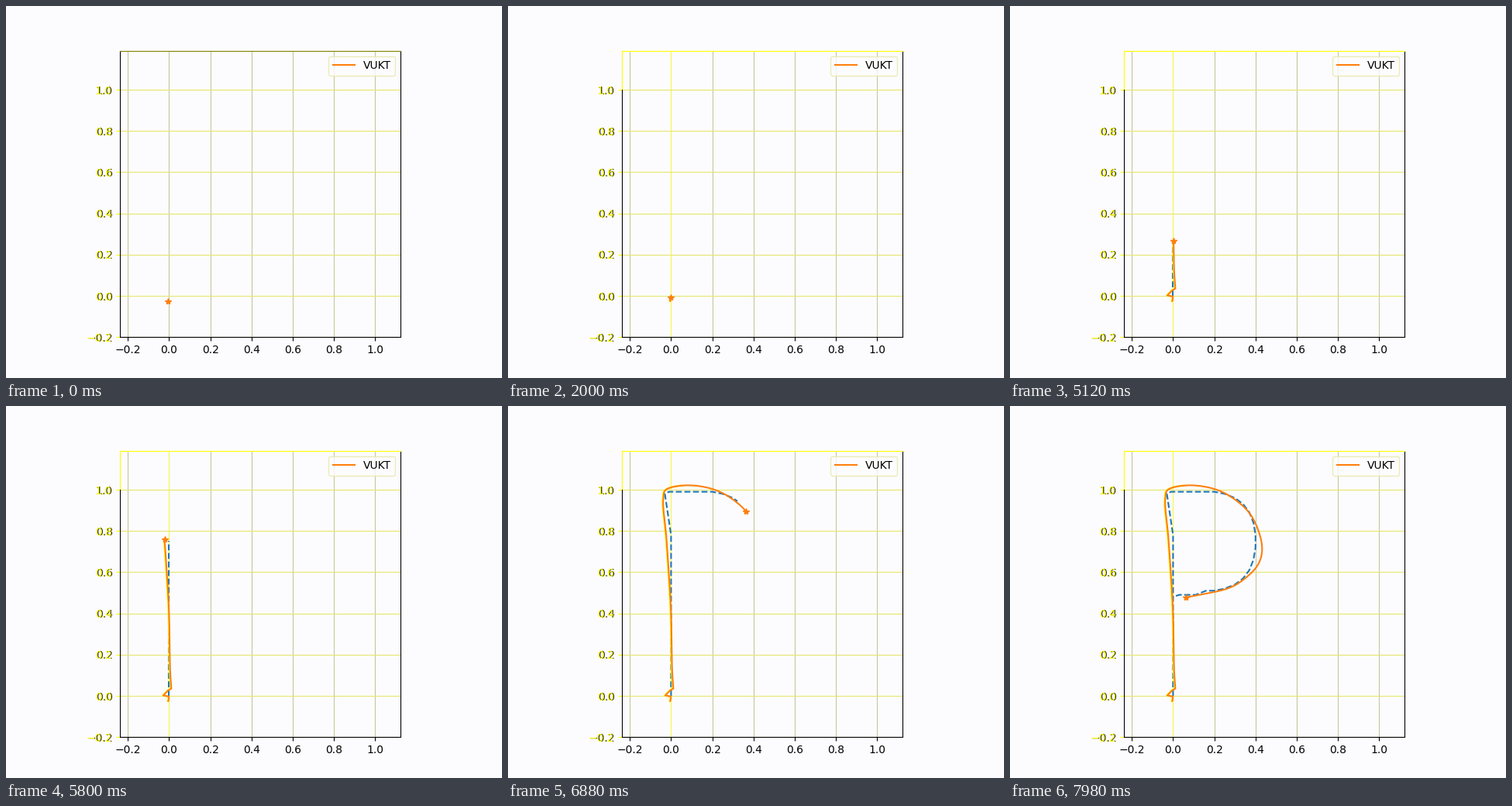
Write a matplotlib script that moves like this. It is 640x480 px and loops after 8000 ms.

```python
import numpy as np
import matplotlib.pyplot as plt
from matplotlib.animation import FuncAnimation

W, H, STEP, FRAMES = 640, 480, 20, 400
X0, Y0, UNIT = 210.4, 374.0, 266.0      # pixel position of (0, 0), pixels per unit
LEFT, RIGHT, TOP, BOTTOM = 147.4, 509.4, 57.6, 427.2

PAPER, YELLOW, ORANGE, BLUE = "#fcfcfe", "#ffff00", "#ff7f0e", "#1f77b4"
GRID_V, GRID_H, GRID_ZERO = "#c6c69c", "#e6e670", "#f6f650"

PLAN_START, STROKE_START, STEM_END, END = 4000, 4580, 5830, 7980   # ms

# key points: time in ms, x, y
DRIFT = np.array([(0, -.004, -.025), (900, 0, -.01), (2900, -.002, -.003),
                  (3780, -.028, .002), (4100, -.005, .026), (STROKE_START, .011, .035)])
STROKE = np.array([(STROKE_START, .011, .035), (4800, .006, .105), (5420, -.003, .466),
                   (5800, -.022, .759), (6120, -.0375, .959), (6240, -.027, .998),
                   (6420, .07, 1.021), (6710, .262, .977), (6890, .367, .891),
                   (7095, .427, .756), (7300, .419, .65), (7550, .318, .547),
                   (END, .0625, .476)])


def linear(keys, t):
    return np.column_stack([np.interp(t, keys[:, 0], keys[:, c]) for c in (1, 2)])


def smooth(keys, t):
    """Cubic Hermite curve through timed points."""
    kt, p = keys[:, 0], keys[:, 1:]
    slope = np.gradient(p, kt, axis=0)
    k = np.clip(np.searchsorted(kt, t, side="right") - 1, 0, len(kt) - 2)
    h = (kt[k + 1] - kt[k])[:, None]
    u = (t - kt[k])[:, None] / h
    return ((1 + 2 * u) * (1 - u) ** 2 * p[k] + u * (1 - u) ** 2 * h * slope[k]
            + u * u * (3 - 2 * u) * p[k + 1] + u * u * (u - 1) * h * slope[k + 1])


def plan_letter():
    """Corners of the planned P after its stem: lead-in, half ellipse, way back."""
    a = np.linspace(np.pi / 2, -np.pi / 2, 14)
    bowl = np.column_stack([.2 + .205 * np.cos(a), .75 + .24 * np.sin(a)]).round(2)
    return np.vstack([[(0, .78), (-.03, .98), (-.01, .99)], bowl,
                      [(.16, .51), (.11, .49), (.03, .49), (0, .48)]])


letter = plan_letter()
lengths = np.append(0, np.cumsum(np.hypot(*np.diff(letter, axis=0).T)))


def plan_until(t):
    """Planned path drawn so far: rising stem, then the letter by arc length."""
    if t < PLAN_START:
        return np.empty((0, 2))
    rise = min((t - PLAN_START) / (STEM_END - PLAN_START), 1)
    stem = np.array([(0, 0), (0, .78 * rise ** 2.2)])
    if t <= STEM_END:
        return stem
    s = lengths[-1] * ((t - STEM_END) / (END - STEM_END)) ** 1.2
    tip = [np.interp(s, lengths, letter[:, c]) for c in (0, 1)]
    return np.vstack([stem, letter[(lengths > 0) & (lengths < s)], [tip]])


times = np.arange(FRAMES) * float(STEP)
flown = np.where(times[:, None] < STROKE_START, linear(DRIFT, times), smooth(STROKE, times))
rim_x = np.where(flown[:, 0] < .06, flown[:, 0] - 0.8 / UNIT, np.nan)

fig = plt.figure(figsize=(W / 100, H / 100), dpi=100, facecolor=PAPER)
ax = fig.add_axes([LEFT / W, 1 - BOTTOM / H, (RIGHT - LEFT) / W, (BOTTOM - TOP) / H],
                  facecolor=PAPER)
x_lo, x_hi = (LEFT - X0) / UNIT, (RIGHT - X0) / UNIT
y_lo, y_hi = -0.2, (Y0 - TOP) / UNIT
ax.set(xlim=(x_lo, x_hi), ylim=(y_lo, y_hi))

# grid, frame and labels
ticks = np.arange(-1, 6) * 0.2
names = [f"{v:.1f}".replace("-", "\u2212") for v in ticks]
ax.set_xticks(ticks, names)
ax.set_yticks(ticks, [""] * len(ticks))
ax.xaxis.grid(True, color=GRID_V)
ax.yaxis.grid(True, color=GRID_H)
ax.tick_params(axis="y", color=YELLOW)
zero_line = ax.xaxis.get_gridlines()[1]
top_edge = ax.spines["top"]
ax.spines["left"].set_bounds(y_lo, 1)
left_edge, = ax.plot([x_lo, x_lo], [1, y_hi], lw=0.8, clip_on=False, zorder=2.5)

# yellow y labels with a dark right rim
for v, name in zip(ticks, names):
    for shift, color in ((0, "black"), (-0.8, YELLOW)):
        ax.text(x_lo + (shift - 9.7) / UNIT, v, name, color=color, fontsize=10,
                ha="right", va="center_baseline")

plan, = ax.plot([], [], "--", color=BLUE)
rim, = ax.plot([], [], color=YELLOW)
trail, = ax.plot([], [], color=ORANGE, label="VUKT")
star, = ax.plot([], [], "*", color=ORANGE, ms=6)
ax.legend(loc="upper right", facecolor=PAPER, edgecolor="#e8e8a6")


def draw(i):
    first = i == 0
    plan.set_data(*plan_until(times[i]).T)
    trail.set_data(*flown[:i + 1].T)
    rim.set_data(rim_x[:i + 1], flown[:i + 1, 1])
    star.set_data(*flown[i:i + 1].T)
    top_edge.set_color("#808000" if first else YELLOW)
    left_edge.set_color("black" if first else YELLOW)
    zero_line.set_color(GRID_V if first else GRID_ZERO)
    return plan, rim, trail, star


anim = FuncAnimation(fig, draw, frames=FRAMES, interval=STEP, repeat=True,
                     repeat_delay=0, blit=False, cache_frame_data=False)
plt.show()
```
